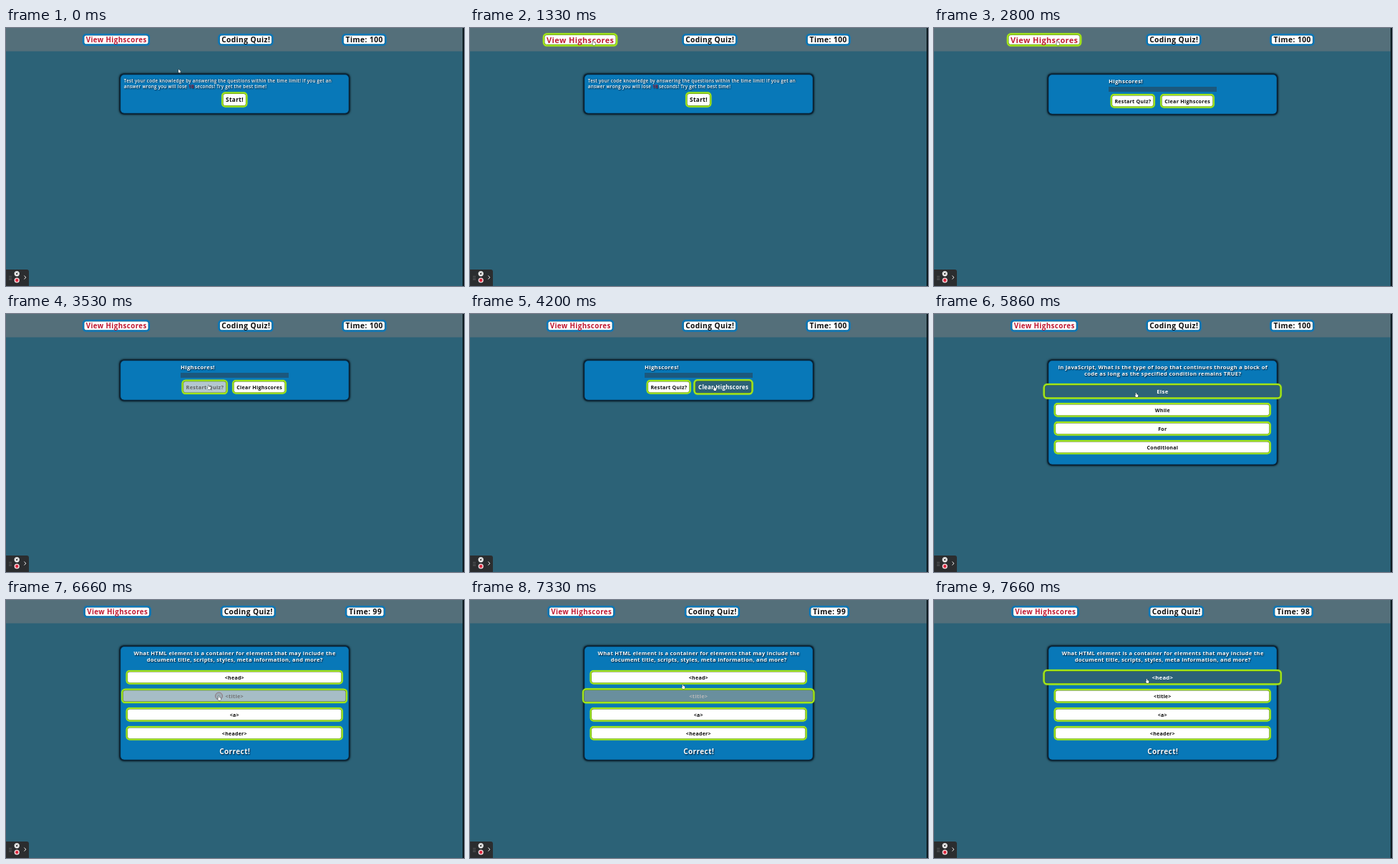
These frames come from a looping animation (640x360 px, 8 s). An HTML page with a canvas:

```html
<!DOCTYPE html>
<html lang="en">
<head>
<meta charset="utf-8">
<title>Coding Quiz</title>
<style>
  html, body { margin: 0; width: 100%; height: 100%; overflow: hidden; background: #2c6277; }
  canvas { display: block; width: 640px; height: 360px; }
</style>
</head>
<body>
<canvas id="stage" width="640" height="360"></canvas>
<script>
const ctx = document.getElementById('stage').getContext('2d');
const LOOP = 8000;
const FONT = '"Open Sans", "Noto Sans", sans-serif';
const SLATE = [44, 98, 119], WHITE = [255, 255, 255], BLACK = [12, 12, 12];
const LIME = [164, 230, 24], BLUE = [8, 120, 188];

// When each screen takes over
const SHOW_SCORES = 2000, SHOW_FIRST = 5660, SHOW_SECOND = 6600;

const questions = [
  {
    lines: ['In JavaScript, What is the type of loop that continues through a block of',
            'code as long as the specified condition remains TRUE?'],
    answers: ['Else', 'While', 'For', 'Conditional'],
    hovers: [[5660, 5980], [6000, 9000]],
    bottom: 211
  },
  {
    lines: ['What HTML element is a container for elements that may include the',
            'document title, scripts, styles, meta information, and more?'],
    answers: ['<head>', '<title>', '<a>', '<header>'],
    hovers: [[7330, 9000], [6600, 7290]],
    bottom: 224,
    feedback: 'Correct!'
  }
];

// Cursor stops: time, x, y
const path = [
  [60, 242, 60], [260, 242, 46], [530, 242, 46], [950, 199, 24], [1330, 173, 21],
  [2800, 173, 21], [3600, 286, 104], [3700, 288, 104], [4200, 342, 104],
  [5000, 342, 104], [5460, 281, 108], [5660, 281, 108], [5860, 283, 113],
  [6200, 298, 137], [7060, 298, 137], [7500, 298, 113]
];
const clicks = [[2000, 173, 18], [4530, 341, 101], [5660, 280, 105], [6600, 297.5, 134]];

const clamp = v => Math.max(0, Math.min(1, v));
const easeOut = v => Math.sin(clamp(v) * Math.PI / 2);
const smooth = v => v * v * (3 - 2 * v);
const mix = (a, b, k) => a + (b - a) * k;
const blend = (a, b, k) => `rgb(${a.map((v, i) => Math.round(mix(v, b[i], k)))})`;

function hoverAmount(t, span) {
  if (!span) return 0;
  return easeOut((t - span[0]) / 220) * (1 - easeOut((t - span[1]) / 220));
}

function cursorAt(t) {
  const next = path.findIndex(p => p[0] > t);
  if (next === 0) return path[0].slice(1);
  if (next < 0) return path[path.length - 1].slice(1);
  const [t0, x0, y0] = path[next - 1], [t1, x1, y1] = path[next];
  const k = smooth((t - t0) / (t1 - t0));
  return [mix(x0, x1, k), mix(y0, y1, k)];
}

function box(x, y, w, h, r, fill) {
  ctx.beginPath();
  ctx.roundRect(x, y, w, h, r);
  ctx.fillStyle = fill;
  ctx.fill();
}

function text(str, x, y, size, color, { weight = 700, align = 'center', shadow = false } = {}) {
  const spacing = size * 0.04;
  ctx.save();
  ctx.font = `${weight} ${size}px ${FONT}`;
  ctx.letterSpacing = `${spacing}px`;
  ctx.textAlign = align;
  ctx.fillStyle = color;
  if (shadow) {
    ctx.shadowColor = '#001020';
    ctx.shadowOffsetX = ctx.shadowOffsetY = 0.8;
    ctx.shadowBlur = 1.5;
  }
  ctx.fillText(str, align === 'center' ? x + spacing / 2 : x, y + size * 0.36);
  ctx.restore();
}

// Glowing bordered label scaled about its centre
function label(str, cx, cy, w, h, size, scale, border, fill, color) {
  ctx.save();
  ctx.translate(cx, cy);
  ctx.scale(scale, scale);
  ctx.save();
  ctx.shadowColor = border;
  ctx.shadowBlur = 1.2;
  box(-w / 2, -h / 2, w, h, 5, border);
  ctx.restore();
  box(-w / 2 + 2, -h / 2 + 2, w - 4, h - 4, 3.2, 'rgba(20,50,40,.65)');
  box(-w / 2 + 2.4, -h / 2 + 2.4, w - 4.8, h - 4.8, 2.8, fill);
  text(str, 0, 0.2, size, color);
  ctx.restore();
}

function button(str, cx, cy, w, h, size, hover = 0) {
  label(str, cx, cy, w, h, size, 1 + 0.1 * hover, `rgb(${LIME})`,
        blend(WHITE, SLATE, hover), blend(BLACK, WHITE, hover));
}

function header(t) {
  box(0, 0, 638, 32.5, 0, '#546f7a');
  const time = 100 - (t >= 6640) - (t >= 7640);
  const narrow = time < 100 ? 1 : 0;
  const hover = hoverAmount(t, [950, 2950]);
  const blue = `rgb(${BLUE})`;
  label('View Highscores', 154 + 1.5 * narrow, 16.4, 94, 16.4, 9.8, 1 + 0.11 * hover,
        blend(BLUE, LIME, hover), '#fff', '#c01830');
  label('Coding Quiz!', 335 + 3.5 * narrow, 16.4, 77, 16.4, 10.2, 1, blue, '#fff', '#0c0c0c');
  label(`Time: ${time}`, 500.5 + 1.5 * narrow, 16.4, narrow ? 56 : 62, 16.4, 10.3, 1,
        blue, '#fff', '#0c0c0c');
}

function panel(bottom) {
  ctx.save();
  ctx.shadowColor = '#000';
  ctx.shadowBlur = 3;
  box(158.5, 63.5, 322, bottom - 63, 6, '#092438');
  ctx.restore();
  box(160.2, 65.2, 318.6, bottom - 66.4, 5, '#0878b8');
}

function introScreen() {
  panel(120);
  const style = { weight: 600, align: 'left', shadow: true };
  text('Test your code knowledge by answering the questions within the time limit! If you get an',
       164.8, 73.4, 6.3, '#fff', style);
  text('answer wrong you will lose', 164.8, 81.6, 6.3, '#fff', style);
  text('10', 255, 81.6, 6.3, '#c0182e', style);
  text('seconds! Try get the best time!', 264, 81.6, 6.3, '#fff', style);
  button('Start!', 319.3, 100, 36, 21, 8.3);
}

function scoresScreen(t) {
  panel(121);
  text('Highscores!', 244, 74, 7.75, '#fff', { align: 'left', shadow: true });
  box(244, 82, 151, 7, 0, '#1b587d');
  const restart = Math.max(hoverAmount(t, [3480, 3860]), hoverAmount(t, [5290, 9000]));
  button('Restart Quiz?', 277.7, 101.8, 62, 19.5, 7.1, restart);
  button('Clear Highscores', 354, 101.8, 75.5, 19.5, 7.15, hoverAmount(t, [3900, 5170]));
}

function questionScreen(t, { lines, answers, hovers, bottom, feedback }) {
  panel(bottom);
  lines.forEach((line, i) => text(line, 319.5, 74 + i * 9.6, 7.6, '#fff', { shadow: true }));
  answers.forEach((answer, i) =>
    button(answer, 319.2, 107.8 + i * 26, 303, 19.5, 7, hoverAmount(t, hovers[i])));
  if (feedback) text(feedback, 319.5, 211.8, 10, '#fff', { shadow: true });
}

function shape(points, x, y) {
  ctx.beginPath();
  points.forEach(([px, py]) => ctx.lineTo(x + px, y + py));
  ctx.closePath();
  ctx.lineJoin = 'round';
  ctx.lineWidth = 0.8;
  ctx.strokeStyle = '#24343c';
  ctx.stroke();
  ctx.fillStyle = '#fff';
  ctx.fill();
}

function cursor(t) {
  for (const [start, x, y] of clicks) {
    const k = (t - start) / 200;
    if (k < 0 || k >= 1) continue;
    ctx.globalAlpha = 1 - k * k;
    ctx.beginPath();
    ctx.arc(x, y, 5, 0, 7);
    ctx.fillStyle = 'rgba(130,130,140,.3)';
    ctx.fill();
    ctx.lineWidth = 0.9;
    ctx.strokeStyle = '#8b6870';
    ctx.stroke();
    ctx.globalAlpha = 1;
  }
  const [x, y] = cursorAt(t);
  const arrow = [[-1, -2.5], [-1, 2.5], [0.2, 1.5], [1, 3], [1.7, 2.6], [1, 1.2], [2.6, 1]];
  const hand = [[-1.2, -3], [-0.2, -3], [-0.1, -0.9], [2.2, -0.3], [2.3, 1.3],
                [1.6, 3], [-0.8, 3], [-2.4, 0.5], [-1.2, 0.6]];
  const pointing = t > 950 && t < 2950 || t > 3480;
  shape(pointing ? hand : arrow, x, y);
}

function dot(x, y, r, color) {
  ctx.beginPath();
  ctx.arc(x, y, r, 0, 7);
  ctx.fillStyle = color;
  ctx.fill();
}

function stroke(points, color, width) {
  ctx.beginPath();
  points.forEach(([x, y]) => ctx.lineTo(x, y));
  ctx.lineWidth = width;
  ctx.strokeStyle = color;
  ctx.stroke();
}

function recorder() {
  box(0, 337, 32, 23, [0, 3, 0, 0], '#2b2d2f');
  for (const x of [5, 7]) for (const y of [346.5, 348.7, 350.9]) dot(x, y, 0.55, '#85888a');
  dot(15.2, 342.8, 3.6, '#f4f4f4');
  stroke([[13.8, 341.4], [16.6, 344.2]], '#222', 1);
  stroke([[16.6, 341.4], [13.8, 344.2]], '#222', 1);
  dot(15.2, 352, 3.6, '#f6dfe2');
  dot(15.2, 352, 2.2, '#df2940');
  stroke([[25.4, 345.5], [27.8, 348], [25.4, 350.5]], '#eee', 1);
}

function draw(t) {
  box(0, 0, 640, 360, 0, '#2c6277');
  header(t);
  if (t < SHOW_SCORES) introScreen();
  else if (t < SHOW_FIRST) scoresScreen(t);
  else questionScreen(t, questions[t < SHOW_SECOND ? 0 : 1]);
  recorder();
  box(638, 0, 2, 360, 0, '#0c1a20');
  cursor(t);
}

function tick() {
  draw(performance.now() % LOOP);
  requestAnimationFrame(tick);
}
tick();
</script>
</body>
</html>
```
